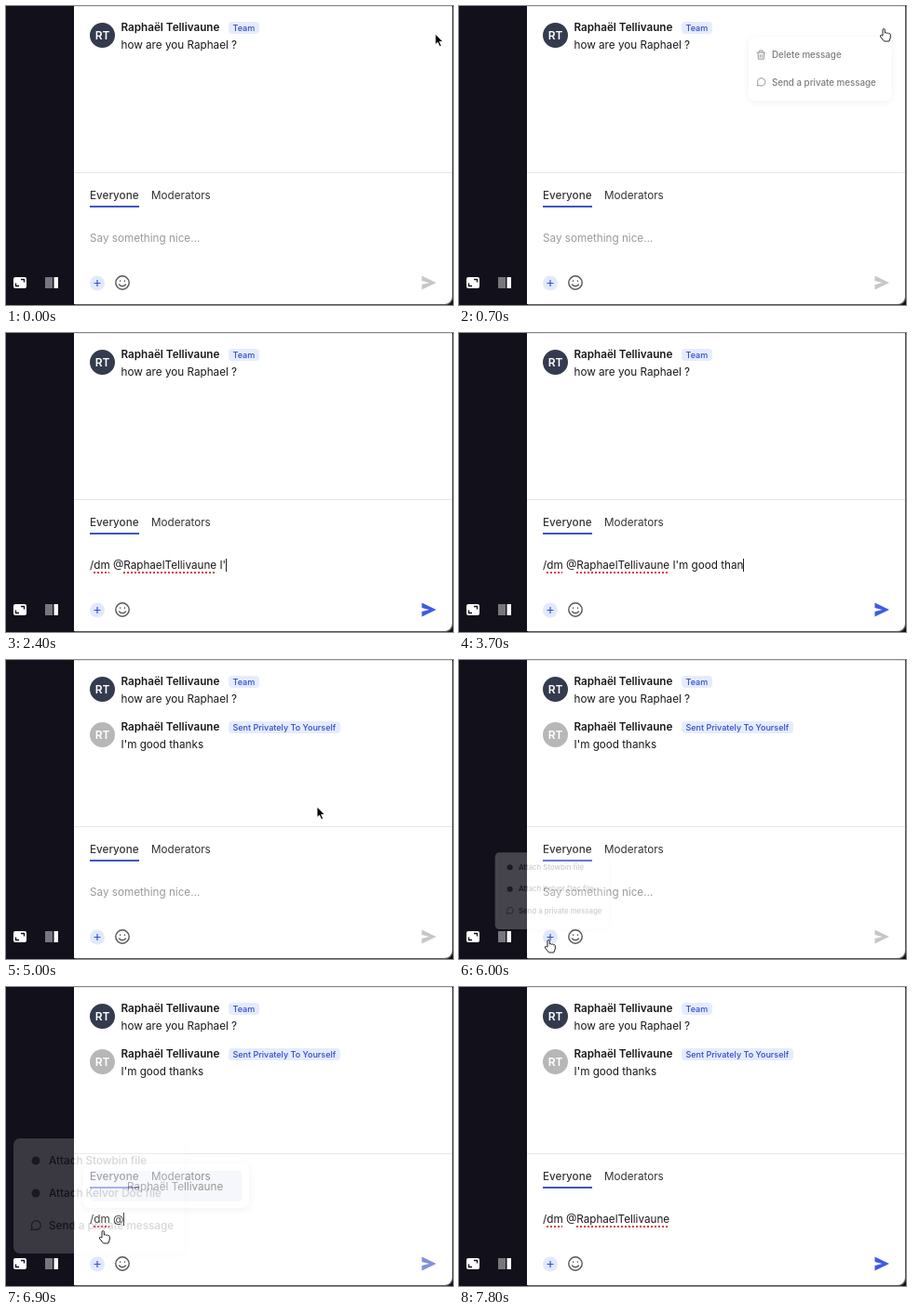
An HTML page that plays this animation: 480x322 px, repeating every 8 s.

```html
<!DOCTYPE html>
<html lang="en">
<head>
<meta charset="utf-8">
<title>Private message in chat</title>
<style>
  html, body { margin: 0; width: 100%; height: 100%; overflow: hidden; background: #12101b; }
  #stage { position: relative; width: 480px; height: 322px; overflow: hidden; background: #12101b;
           font: 11.7px/16px Inter, sans-serif; color: #18181b; }
  #stage div, #stage svg { position: absolute; }
  .panel { left: 73px; top: 0; width: 406px; height: 321px; background: #fff;
           border-radius: 0 0 8px 0; box-shadow: 1px 1px #55555c, inset 0 1px #e2e2e4; }
  .text { left: calc(var(--x) * 1px); top: calc(var(--y) * 1px - 8px); white-space: pre; }
  .bold { font-weight: 600; }
  .medium { font-weight: 500; }
  .blue { color: #3049d0; }
  .tag { font-size: 9px; line-height: 13px; font-weight: 500; color: #3049d0; background: #e5ecfd;
         border-radius: 4px; padding: 0 4.5px; margin-top: 1.5px; }
  .avatar { left: 90px; width: 27px; height: 27px; border-radius: 50%; color: #fff;
            font: 600 12px/27px Inter, sans-serif; text-align: center; }
  .menu, #suggest { background: #fff; border-radius: 7px; box-shadow: 0 2px 10px #0000001c; }
  .menu { width: 184px; }
  #hover { left: 0; top: 46px; width: 184px; height: 27px; background: #f6f8ff; }
  .misspelt { text-decoration: underline dotted #d8384b 1.5px; text-underline-offset: 2.5px;
              text-decoration-skip-ink: none; }
  #caret { display: inline-block; width: 1px; height: 14px; margin-right: -1px;
           background: #222; vertical-align: -3px; }
</style>
</head>
<body>
<div id="stage">
  <div class="panel"></div>

  <div class="avatar" style="top:18px;background:#343b4e">RT</div>
  <div class="text bold" style="--x:123.5;--y:23">Raphaël Tellivaune</div>
  <div class="text tag" style="--x:239;--y:23">Team</div>
  <div class="text" style="--x:123.5;--y:42">how are you Raphael ?</div>

  <div id="reply" style="left:0;top:0">
    <div class="avatar" style="top:67px;background:#b7b7b7">RT</div>
    <div class="text bold" style="--x:123.5;--y:72">Raphaël Tellivaune</div>
    <div class="text tag" style="--x:239;--y:72">Sent Privately To Yourself</div>
    <div class="text" style="--x:123.5;--y:91">I'm good thanks</div>
  </div>

  <div style="left:73px;top:179px;width:406px;height:1px;background:#e6e6e9"></div>
  <div class="text medium" style="--x:90;--y:204;color:#333">Everyone</div>
  <div class="text" style="--x:156;--y:204;color:#333">Moderators</div>
  <div style="left:90px;top:215px;width:53px;height:2px;background:#3f55c4"></div>

  <svg width="480" height="322" fill="none">
    <rect x="8" y="292" width="14" height="12" rx="2" fill="#fff"/>
    <path d="M16 294.5h3.5v3M10.500 298.500v3h3.500" stroke="#12101b" stroke-width="1.3"/>
    <path d="M42 292h8v12h-8z" fill="#77767c"/>
    <path d="M51.500 292h4.500v12h-4.500z" fill="#fff"/>
    <circle cx="98" cy="298.500" r="8" fill="#e1e9fc"/>
    <path d="M94.500 298.500h7M98 295v7" stroke="#3852d5" stroke-width="1.2"/>
    <g stroke="#555" stroke-width="1.4" stroke-linecap="round">
      <circle cx="125" cy="298" r="7.200"/>
      <path d="M121.500 300q3.500 3.500 7 0M122.600 296v.2M127.400 296v.2"/>
    </g>
    <path id="send" d="M446.500 290.500L462 298l-15.500 7.500v-5.500l8-2-8-2z"/>
  </svg>

  <div id="suggest" style="left:83px;top:190px;width:178px;height:48px">
    <div style="left:7px;top:8px;width:163px;height:33px;border-radius:4px;background:#edf0fb"></div>
    <div class="text" style="--x:47;--y:25;color:#333">Raphaël Tellivaune</div>
  </div>

  <div id="input" class="text" style="--x:90;--y:250"></div>

  <div id="messageMenu" class="menu" style="left:282px;top:33px;height:83px;transform-origin:174px 0">
    <div id="hover"></div>
    <svg width="30" height="83" fill="none" stroke="#333" stroke-width="1.100">
      <path d="M10.500 20.500h11M14 20v-2h4v2M12 20.500l.5 8.500h7l.5-8.500M14.800 23v4M17.200 23v4"/>
      <path class="bubble" d="M11 63.500l1-2.500a5 5 0 1 1 2 2z"/>
    </svg>
    <div class="text medium" style="--x:30;--y:24">Delete message</div>
    <div id="privateLabel" class="text medium" style="--x:30;--y:59">Send a private message</div>
  </div>

  <div id="plusMenu" class="menu" style="left:8px;top:163px;height:124px;transform-origin:92px 133px">
    <svg width="40" height="124" fill="none" stroke="#333" stroke-width="1.100">
      <circle cx="24" cy="24" r="4.500" fill="#444" stroke="none"/>
      <circle cx="24" cy="59" r="4.500" fill="#444" stroke="none"/>
      <path d="M19 98.500l1-2.500a5 5 0 1 1 2 2z"/>
    </svg>
    <div class="text medium" style="--x:38;--y:24">Attach Stowbin file</div>
    <div class="text medium" style="--x:38;--y:59">Attach Kelvor Doc file</div>
    <div class="text medium" style="--x:38;--y:94">Send a private message</div>
  </div>

  <svg id="pointer" width="16" height="20" viewBox="-3 -1 16 20" stroke-linejoin="round">
    <path id="arrow" d="M0 0v11.500l2.600-2.300 2 4.500 2-.9-2-4.300h3.600z" fill="#000" stroke="#fff" stroke-width=".9"/>
    <path id="hand" d="M1 8V1.200q1.200-1.400 2.300 0V5q1.200-.9 2 .3 1.300-.8 2 .4 1.700-.6 2 .8v3.500l-1.500 4H2.500L-1.500 9q-.5-1.800 1-1.600z" fill="#fff" stroke="#222"/>
  </svg>
</div>

<script>
const $ = id => document.getElementById(id);
const LOOP = 8000, STEP = 100;
const clamp = v => Math.max(0, Math.min(1, v));
const progress = (t, start, length) => clamp((t - start) / length);
const between = (t, a, b) => t >= a && t < b;
const ease = p => p * p * (3 - 2 * p);

// Pointer stops: time, x, y
const stops = [
  [100, 461, 30], [500, 454, 24], [800, 454, 24], [1200, 377, 88], [1700, 377, 88],
  [2100, 374, 158], [4700, 374, 158], [5000, 334, 158], [5500, 94, 301],
  [6200, 94, 301], [6500, 102, 262]
];

function pointerAt(t) {
  const next = stops.findIndex(s => s[0] > t);
  if (next === 0) return stops[0].slice(1);
  if (next < 0) return stops[stops.length - 1].slice(1);
  const [a, b] = [stops[next - 1], stops[next]];
  const p = ease(progress(t, a[0], b[0] - a[0]));
  return [a[1] + (b[1] - a[1]) * p, a[2] + (b[2] - a[2]) * p];
}

const reply = "I'm good thanks";
const keyTime = i => i < 4 ? [2300, 2400, 2600, 2700][i] : 2900 + (i - 4) * 100;
const typed = t => [...reply].filter((_, i) => t >= keyTime(i)).join("");

const command = '/<span class="misspelt">dm</span> @';
const recipient = '<span class="misspelt">RaphaelTellivaune</span>';
const caret = '<span id="caret"></span>';

function inputAt(t) {
  if (between(t, 1800, 4100)) return command + recipient + " " + typed(t) + caret;
  if (between(t, 6800, 7600)) return command + (t < 7300 ? caret : "");
  if (t >= 7600) return command + recipient + (t < 7800 ? " " + caret : "");
  return '<span style="color:#999">Say something nice…</span>';
}

function showMenu(menu, t, open, close) {
  const grow = progress(t, open, 300);
  menu.style.opacity = grow ** 1.4 * (1 - progress(t, close, 180));
  menu.style.transform = `scale(${0.5 + grow / 2})`;
}

function setSend(t) {
  const on = progress(t, 1700, 200) - progress(t, 4000, 200) + progress(t, 6800, 200);
  const mix = (a, b) => Math.round(a + (b - a) * on);
  $("send").setAttribute("fill", `rgb(${mix(199, 61)},${mix(199, 91)},${mix(199, 230)})`);
}

let lastInput;
function draw() {
  const t = Math.floor(performance.now() % LOOP / STEP) * STEP;

  showMenu($("messageMenu"), t, 500, 1650);
  showMenu($("plusMenu"), t, 5900, 6750);
  const hovered = t >= 1100;
  $("hover").style.opacity = +hovered;
  $("privateLabel").classList.toggle("blue", hovered);
  document.querySelector(".bubble").setAttribute("stroke", hovered ? "#3049d0" : "#333");

  $("suggest").style.opacity = t < 7600 ? progress(t, 6800, 200) : 1 - progress(t, 7500, 200);
  if (t >= 7700) $("suggest").style.opacity = 0;
  $("reply").style.opacity = +(t >= 4200);
  setSend(t);

  const content = inputAt(t);
  if (content !== lastInput) $("input").innerHTML = lastInput = content;

  const [x, y] = pointerAt(t);
  const pointing = between(t, 400, 1800) || t >= 5400;
  $("pointer").style.left = x - 3 + "px";
  $("pointer").style.top = y - 1 + "px";
  $("pointer").style.opacity = +!(between(t, 2300, 4700) || t >= 7600);
  $("arrow").style.opacity = +!pointing;
  $("hand").style.opacity = +pointing;

  requestAnimationFrame(draw);
}
draw();
</script>
</body>
</html>
```
